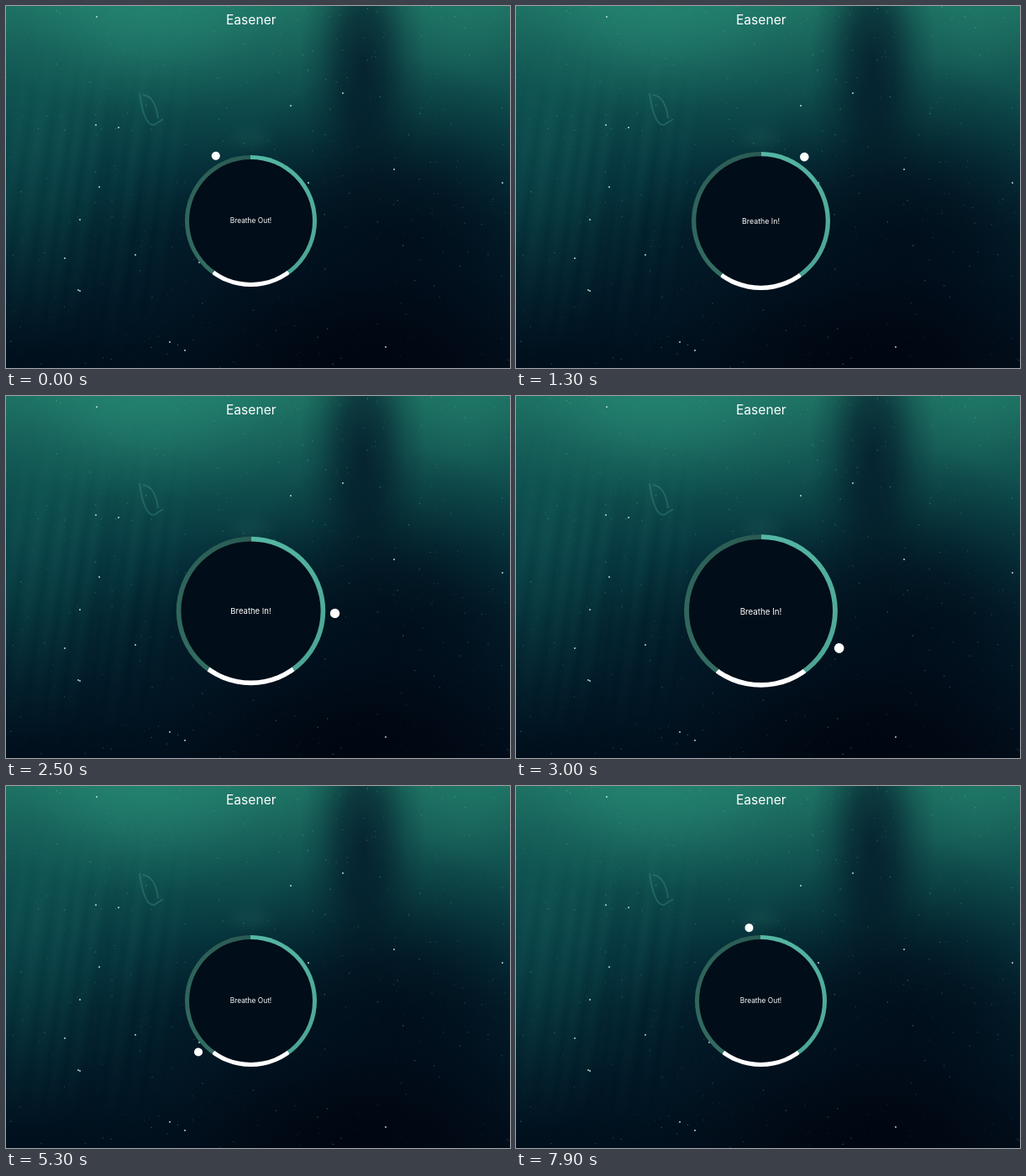
These frames come from a looping animation (600 by 432 pixels, 8 s). An HTML page with a canvas:

```html
<!DOCTYPE html>
<html lang="en">
<head>
<meta charset="utf-8">
<title>Breathing exercise</title>
<style>
  html, body { margin: 0; width: 100%; height: 100%; overflow: hidden; background: #010d1a; }
  body { position: relative; color: #fff; font-family: Inter, sans-serif; }
  canvas { position: absolute; left: 0; top: 0; }
  h1 { position: absolute; left: 191.8px; top: 6px; width: 200px; margin: 0;
    font-size: 15.6px; font-weight: 400; line-height: 21px; text-align: center; }
  #ring { position: absolute; left: 213px; top: 177.8px; width: 157px; height: 157px; border-radius: 50%;
    background: conic-gradient(#55b7a4 0%, #4ca493 40%, #fff 40%, #fff 60%, #336d62 60%, #2a5b52 100%); }
  #disc { position: absolute; inset: 4.9px; border-radius: 50%; background: #010d18;
    display: flex; align-items: center; justify-content: center; font-size: 8.4px; white-space: nowrap; }
  #arm { position: absolute; left: 50%; top: 50%; width: 0; height: 0; }
  #arm::before { content: ""; position: absolute; left: -4.9px; top: -93.2px;
    width: 9.8px; height: 9.8px; border-radius: 50%; background: #fff; }
</style>
</head>
<body>
<canvas id="sea" width="600" height="432"></canvas>
<h1>Easener</h1>
<div id="ring"><div id="disc"></div><div id="arm"></div></div>
<script>
const $ = id => document.getElementById(id);
const ctx = $('sea').getContext('2d');

let seed = 11;
const rnd = () => (seed = seed * 16807 % 2147483647) / 2147483647;

function blob(x, y, rx, ry, rgb, alpha) {
  ctx.save();
  ctx.translate(x, y);
  ctx.scale(rx, ry);
  const g = ctx.createRadialGradient(0, 0, 0, 0, 0, 1);
  for (const [stop, k] of [[0, 1], [0.35, 0.75], [0.7, 0.25], [1, 0]])
    g.addColorStop(stop, `rgba(${rgb},${alpha * k})`);
  ctx.fillStyle = g;
  ctx.fillRect(-1, -1, 2, 2);
  ctx.restore();
}

function dot(x, y, r, fill) {
  ctx.fillStyle = fill;
  ctx.beginPath();
  ctx.arc(x, y, r, 0, 7);
  ctx.fill();
}

function drawSea() {
  const water = ctx.createLinearGradient(0, 0, 0, 432);
  [[0, '#1d7162'], [0.12, '#175f58'], [0.28, '#0d4a4b'], [0.45, '#06343e'],
   [0.62, '#03232f'], [0.8, '#021826'], [1, '#010f1c']]
    .forEach(([stop, color]) => water.addColorStop(stop, color));
  ctx.fillStyle = water;
  ctx.fillRect(0, 0, 600, 432);

  // light above, shade on the right and below
  blob(170, 0, 220, 130, '42,146,124', 0.5);
  blob(20, 170, 130, 250, '17,92,88', 0.35);
  blob(425, 70, 75, 190, '2,24,40', 0.8);
  blob(465, 290, 230, 230, '0,9,22', 0.8);
  blob(300, 300, 190, 160, '1,13,26', 0.5);
  blob(420, 420, 260, 120, '0,4,14', 0.75);
  blob(550, 10, 80, 90, '34,130,110', 0.3);
  blob(292, 158, 34, 20, '40,110,100', 0.2);

  // slanted shafts of light
  ctx.filter = 'blur(4px)';
  for (let i = 0; i < 9; i++) {
    const x = 15 + i * 23 + rnd() * 12, w = 4 + rnd() * 9;
    const beam = ctx.createLinearGradient(0, 30, 0, 420);
    beam.addColorStop(0, 'rgba(60,160,140,0)');
    beam.addColorStop(0.35, `rgba(60,160,140,${0.05 + rnd() * 0.09})`);
    beam.addColorStop(1, 'rgba(60,160,140,0)');
    ctx.fillStyle = beam;
    ctx.beginPath();
    ctx.moveTo(x + 12, 20);
    ctx.lineTo(x + 12 + w, 20);
    ctx.lineTo(x - 40 + w, 430);
    ctx.lineTo(x - 45, 430);
    ctx.fill();
  }
  ctx.filter = 'none';

  // faint curl
  ctx.strokeStyle = 'rgba(80,170,150,.28)';
  ctx.lineWidth = 2;
  ctx.beginPath();
  ctx.moveTo(159, 104);
  ctx.quadraticCurveTo(164, 142, 176, 142);
  ctx.lineTo(187, 135);
  ctx.moveTo(163, 106);
  ctx.quadraticCurveTo(178, 108, 181, 134);
  ctx.stroke();

  // drifting specks
  for (let i = 0; i < 800; i++) {
    const y = 432 * rnd() ** 1.25;
    dot(rnd() * 600, y, 0.3 + rnd() * 0.5, `rgba(110,205,185,${0.08 + 0.4 * rnd() ** 2})`);
  }
  [[401, 104], [339, 119], [134, 145], [107, 142], [108, 13], [86, 339], [88, 340], [154, 297],
   [213, 411], [452, 407], [462, 195], [591, 211], [111, 216], [230, 306], [88, 255],
   [195, 401], [70, 301], [360, 211]]
    .forEach(([x, y]) => dot(x, y, 1, 'rgba(205,245,232,.85)'));
}

const LOOP = 8000, STEP = 100, GROW = 540, BREATH = 3000, HOLD = 1500;

function frame(now) {
  const t = Math.floor(now % LOOP / STEP) * STEP;
  const s = t - GROW;
  const breathing = s >= 0 && s < BREATH + HOLD;
  const scale = breathing ? 1 + 0.2 * Math.min(1, s / BREATH) : 1;
  const label = !breathing ? 'Breathe Out!' : s < BREATH ? 'Breathe In!' : 'HOLD';
  if ($('disc').textContent !== label) $('disc').textContent = label;
  $('ring').style.transform = `scale(${scale})`;
  $('arm').style.transform = `rotate(${331.3 + t * 0.048}deg)`;
  requestAnimationFrame(frame);
}

drawSea();
frame(performance.now());
</script>
</body>
</html>
```
